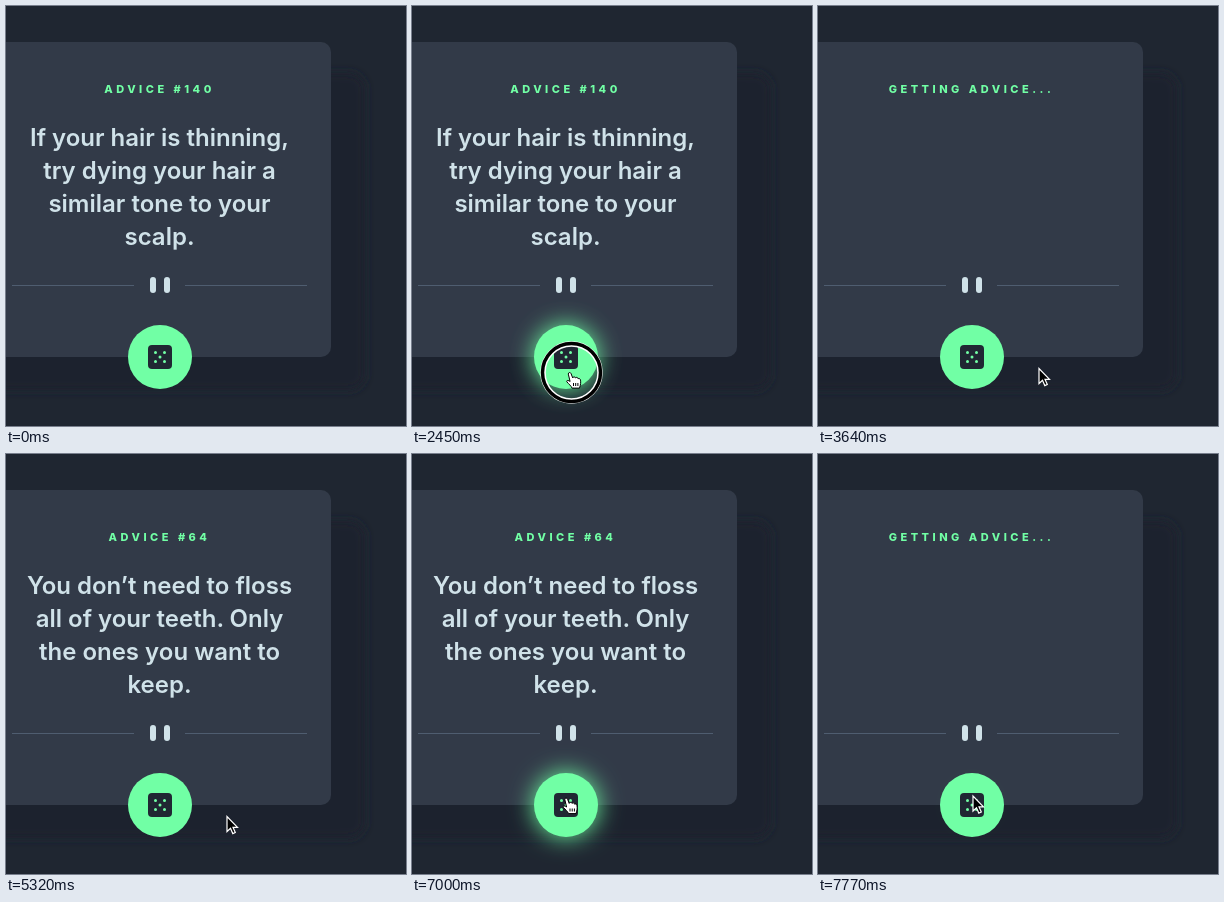
These frames come from a looping animation (400 px wide and 420 px high, 8000 ms). An HTML page:

```html
<!DOCTYPE html>
<html lang="en">
<head>
<meta charset="utf-8">
<title>Advice generator</title>
<style>
  html, body { margin: 0; width: 100%; height: 100%; overflow: hidden; background: #1f2631; }
  svg { display: block; }
  text { font-family: Inter, sans-serif; text-anchor: middle; }
  #label { font-size: 11px; font-weight: 800; letter-spacing: 3.5px; fill: #71ffa5; }
  #quote { font-size: 24px; font-weight: 600; fill: #d0e2e9; }
</style>
</head>
<body>
<svg width="400" height="420" viewBox="0 0 400 420">
  <defs>
    <filter id="soft" x="-100%" y="-100%" width="300%" height="300%"><feGaussianBlur stdDeviation="12"/></filter>
    <filter id="shade" x="-20%" y="-20%" width="140%" height="140%"><feGaussianBlur stdDeviation="5"/></filter>
  </defs>
  <rect width="400" height="420" fill="#1f2631"/>
  <rect x="-60" y="67" width="419" height="317" rx="16" fill="#1f242d" filter="url(#shade)"/>
  <rect x="-40" y="36" width="365" height="315" rx="10" fill="#323a48"/>
  <text id="label" x="153.5" y="87"></text>
  <g id="quote"></g>
  <path d="M6 279.5H128M179 279.5H301" stroke="#4f5d70"/>
  <g fill="#d0e2e9">
    <rect x="144" y="271" width="6" height="16" rx="3"/>
    <rect x="158" y="271" width="6" height="16" rx="3"/>
  </g>
  <circle id="glow" cx="154" cy="351" r="32" fill="#71ffa5" filter="url(#soft)"/>
  <circle cx="154" cy="351" r="32" fill="#71ffa5"/>
  <rect x="142" y="339" width="24" height="24" rx="4" fill="#202733"/>
  <path d="M149.5 346.5h0M158.5 346.5h0M154 351h0M149.5 355.5h0M158.5 355.5h0"
        stroke="#71ffa5" stroke-width="3" stroke-linecap="round"/>
  <g id="pointer">
    <g id="ring" fill="none">
      <circle r="28.5" stroke="#fff" stroke-width="5.5"/>
      <circle r="29" stroke="#000" stroke-width="3.5"/>
    </g>
    <path id="arrow" d="M.5 .5V15.5L4 12.2L6.3 17.6L8.8 16.5L6.5 11.3H11Z" fill="#000" stroke="#fff" stroke-width="1.2"/>
    <path id="hand" d="M-3.2 1.6C-3.4 -.2 -1 -.6 -.4 1.2L1.2 5.4C1.6 4 3.6 4 4 5.4C4.8 4.4 6.4 4.8 6.6 6.2C7.6 5.6 8.8 6.2 9 7.6C9.4 10 9.2 12 8 15.6H.6C-.6 13.2 -2.6 11.6 -4.6 9.4C-5.4 7.8 -3.4 7.4 -1.4 9ZM2 10.5V13.5M4.2 10.5V13.5M6.4 10.5V13.5"
          fill="#fff" stroke="#000" stroke-width="1" stroke-linejoin="round"/>
  </g>
</svg>
<script>
const LOOP = 8000, STEP = 70, FADE = 300;
const $ = id => document.getElementById(id);
const show = (id, on) => $(id).style.display = on ? '' : 'none';
const clamp = v => Math.max(0, Math.min(1, v));
const ease = v => v * v * (3 - 2 * v);

const screens = [
  { from: 0, label: 'ADVICE #140', lines: ['If your hair is thinning,', 'try dying your hair a', 'similar tone to your', 'scalp.'] },
  { from: 2590, label: 'GETTING ADVICE...', lines: [] },
  { from: 5320, label: 'ADVICE #64', lines: ['You don’t need to floss', 'all of your teeth. Only', 'the ones you want to', 'keep.'] },
  { from: 7490, label: 'GETTING ADVICE...', lines: [] }
];

// Each move is a quadratic curve: start point, bend, end point.
const moves = [
  { start: 1750, end: 2450, path: [[379, 370], [240, 416], [159.5, 366.5]] },
  { start: 3220, end: 3640, path: [[159, 366], [185, 330], [220.5, 362]] },
  { start: 6370, end: 7000, path: [[220.5, 362], [185, 350], [156, 344]] },
  { start: 7420, end: 7770, path: [[156, 344], [155, 343], [154.5, 341.5]] }
];

const hovers = [{ enter: 2170, leave: 2590 }, { enter: 6580, leave: 7490 }];
const clicks = [2450, 7350];

function pointerAt(t) {
  const { start, end, path: [a, b, c] } = moves.findLast(m => t >= m.start) || moves[0];
  const u = ease(clamp((t - start) / (end - start))), v = 1 - u;
  return a.map((p, i) => v * v * p + 2 * u * v * b[i] + u * u * c[i]);
}

let current;
function setScreen(screen) {
  if (screen === current) return;
  current = screen;
  $('label').textContent = screen.label;
  $('quote').innerHTML = screen.lines
    .map((line, i) => `<text x="153.5" y="${140 + 33 * i}">${line}</text>`).join('');
}

function draw(now) {
  const t = Math.floor(now % LOOP / STEP) * STEP;
  setScreen(screens.findLast(s => t >= s.from));

  const glow = hovers.reduce((sum, h) =>
    sum + ease(clamp((t - h.enter) / FADE)) - ease(clamp((t - h.leave) / FADE)), 0);
  $('glow').style.opacity = glow;

  const hovering = hovers.some(h => t >= h.enter && t < h.leave);
  show('pointer', t >= moves[0].start);
  show('hand', hovering);
  show('arrow', !hovering);
  show('ring', clicks.some(c => t >= c && t < c + 2 * STEP));
  $('pointer').setAttribute('transform', `translate(${pointerAt(t)})`);
  requestAnimationFrame(draw);
}

const began = performance.now();
draw(0);
function tick() { }
</script>
</body>
</html>
```
